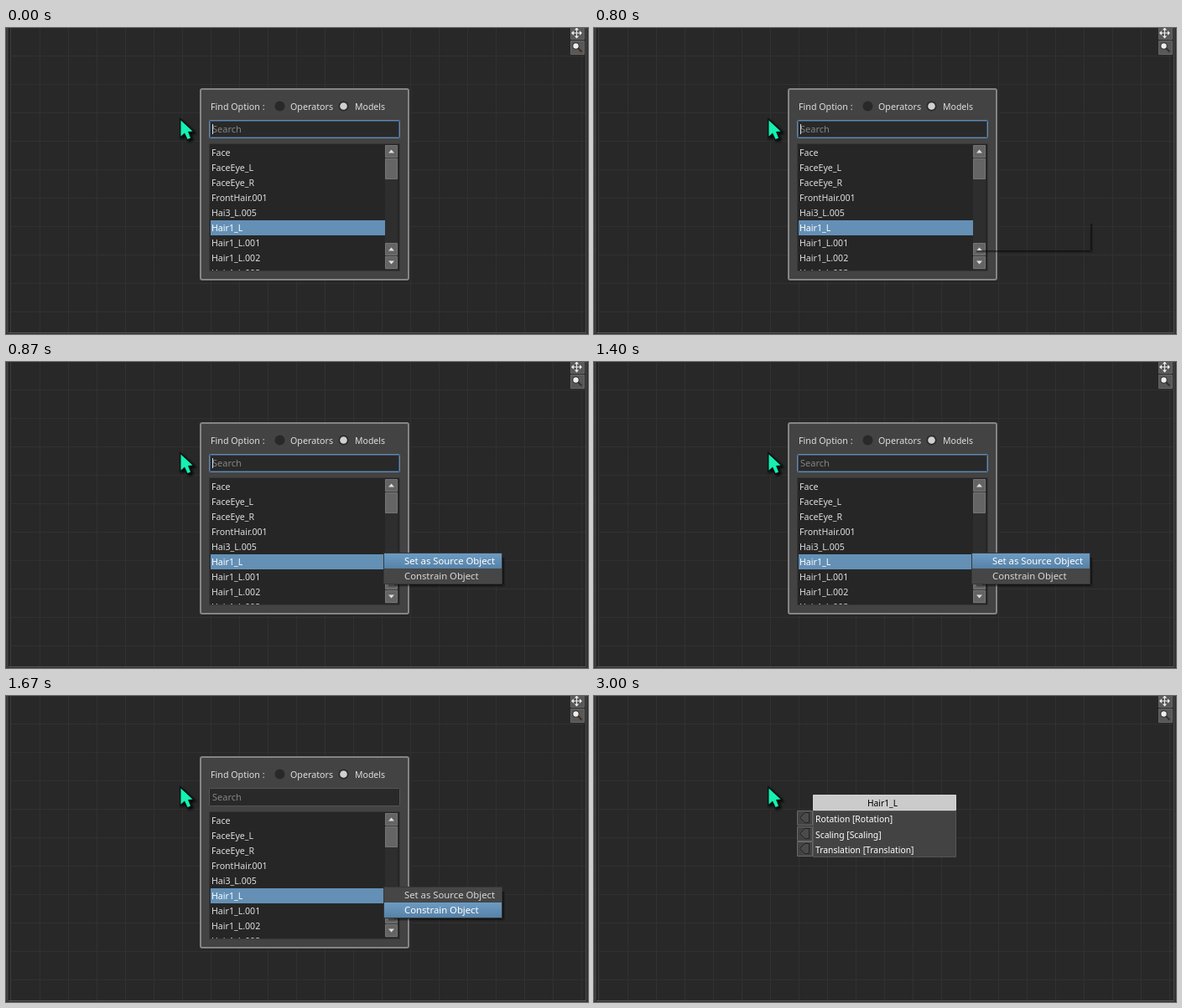
An HTML page with a canvas that plays this animation: 694x366 px, repeating every 3200 ms.

```html
<!DOCTYPE html>
<html lang="en">
<head>
<meta charset="utf-8">
<title>Node search popup</title>
<style>
html, body { margin: 0; width: 100%; height: 100%; overflow: hidden; background: #282828; }
canvas { display: block; }
</style>
</head>
<body>
<canvas id="stage" width="694" height="366"></canvas>
<script>
const ctx = document.getElementById('stage').getContext('2d');
const LOOP = 3200;
const ITEMS = ['Face', 'FaceEye_L', 'FaceEye_R', 'FrontHair.001', 'Hai3_L.005',
  'Hair1_L', 'Hair1_L.001', 'Hair1_L.002', 'Hair1_L.003'];
const BLUE = '#6490b6';

function rect(x, y, w, h, color) {
  ctx.fillStyle = color;
  ctx.fillRect(x, y, w, h);
}

function box(x, y, w, h, fill, border, line = 1, radius = 0) {
  ctx.beginPath();
  ctx.roundRect(x + line / 2, y + line / 2, w - line, h - line, radius);
  ctx.fillStyle = fill;
  ctx.fill();
  ctx.strokeStyle = border;
  ctx.lineWidth = line;
  ctx.stroke();
}

function polygon(points, fill, stroke, line = 1) {
  ctx.beginPath();
  points.forEach(([x, y]) => ctx.lineTo(x, y));
  ctx.closePath();
  if (fill) { ctx.fillStyle = fill; ctx.fill(); }
  if (stroke) { ctx.strokeStyle = stroke; ctx.lineWidth = line; ctx.stroke(); }
}

function disc(x, y, r, color) {
  ctx.beginPath();
  ctx.arc(x, y, r, 0, 7);
  ctx.fillStyle = color;
  ctx.fill();
}

function text(str, x, y, size, color = '#dedede', align = 'left') {
  ctx.font = `${size}px "Noto Sans", sans-serif`;
  ctx.textAlign = align;
  ctx.fillStyle = color;
  ctx.fillText(str, x, y);
}

function drawBackground() {
  rect(0, 0, 694, 366, '#282828');
  for (let x = 40; x < 690; x += 34) rect(x, 0, 1, 364, '#313131');
  for (let y = 33; y < 364; y += 34) rect(5, y, 686, 1, '#313131');
  rect(0, 0, 3, 366, '#343434');
  rect(1, 0, 1, 366, '#444');
  rect(3, 0, 2, 364, '#242424');
  rect(5, 0, 1, 364, '#3c3c3c');
  rect(691, 0, 1, 366, '#4a4a4a');
  rect(692, 0, 2, 366, '#303030');
  rect(3, 364, 689, 1, '#555');
  rect(0, 365, 694, 1, '#303030');
  drawToolButtons();
}

function drawToolButtons() {
  box(673, -3, 17, 17, '#585858', '#666');
  box(673, 15, 17, 17, '#585858', '#666');
  ctx.save();
  ctx.translate(680.5, 6);
  for (let i = 0; i < 4; i++) {
    rect(-.5, -5, 1, 5, '#eee');
    polygon([[0, -6.5], [2.7, -3.5], [-2.7, -3.5]], '#eee');
    ctx.rotate(Math.PI / 2);
  }
  ctx.restore();
  polygon([[682, 24], [686.5, 28.5]], null, '#402c20', 2);
  disc(679.5, 21.5, 4, '#222');
  disc(679.5, 21.5, 3.2, '#eee');
}

function drawScrollButton(y, direction) {
  box(452, y, 15, 15, '#646464', '#747474');
  const mid = y + 7.5;
  polygon([[459.5, mid - 2 * direction], [463, mid + 2 * direction], [456, mid + 2 * direction]], '#dedede');
}

function drawScrollBar() {
  rect(452, 140, 15, 149, '#3a3a3a');
  for (let y = 181; y < 257; y++)
    for (let x = 452 + y % 2; x < 467; x += 2) rect(x, y, 1, 1, '#222');
  drawScrollButton(140, 1);
  box(452, 156, 15, 25, '#656565', '#747474');
  drawScrollButton(257, 1);
  drawScrollButton(273, -1);
}

function drawSearch(focused, caret) {
  box(242, 110, 228, 22, '#292929', focused ? '#6489af' : '#545454', 1, 1);
  if (focused) box(243, 111, 226, 20, '#292929', '#3f566d');
  text('Search', 246, 125, 11, '#858585');
  if (caret) rect(246, 115, 1, 12, '#e0e0e0');
}

function drawDialog(focused, caret) {
  box(232, 73, 250, 230, '#222', '#242424', 1, 3);
  box(231, 72, 250, 230, '#434343', '#858585', 2, 2);
  text('Find Option :', 244, 98, 10.7);
  disc(326.5, 93.5, 6, '#292929');
  text('Operators', 339, 98, 10.7);
  disc(402.5, 93.5, 6, '#292929');
  disc(402.5, 93.5, 4.3, '#d0d0d0');
  text('Models', 416, 98, 10.5);
  drawSearch(focused, caret);

  box(242, 138, 228, 153, '#262626', '#363636');
  ctx.save();
  ctx.beginPath();
  ctx.rect(243, 139, 226, 151);
  ctx.clip();
  rect(244, 230, 208, 18, BLUE);
  ITEMS.forEach((item, i) => text(item, 245, 153 + 18 * i, 10.6, i === 5 ? '#fff' : '#dedede'));
  ctx.restore();
  drawScrollBar();
}

function drawMenuShadow() {
  for (let i = 0; i < 3; i++) {
    const color = `rgba(0,0,0,${.55 - .18 * i})`;
    rect(592 + i, 234, 1, 32 + i, color);
    rect(456, 266 + i, 136 + i, 1, color);
  }
}

function drawMenu(selected) {
  box(450, 228, 142, 38, '#464646', '#363636');
  const top = 229 + 18 * selected;
  const shine = ctx.createLinearGradient(0, top, 0, top + 18);
  shine.addColorStop(0, '#6d9bc3');
  shine.addColorStop(1, '#5782a8');
  rect(451, top, 140, 18, shine);
  ['Set as Source Object', 'Constrain Object'].forEach((label, i) =>
    text(label, 475, 242 + 18 * i, 11.3, i === selected ? '#fff' : '#d8d8d8'));
}

function drawNode() {
  box(261, 137, 171, 56, '#434343', '#555');
  box(261, 118, 171, 19, '#cbcbcb', '#d5d5d5');
  text('Hair1_L', 344, 132, 10.3, '#000', 'center');
  ['Rotation', 'Scaling', 'Translation'].forEach((name, i) => {
    const y = 137 + 18.6 * i;
    const top = Math.round(y);
    box(242, top, 19, 18, '#434343', '#696969');
    polygon([[245.5, top + 8.5], [251.5, top + 2.5], [256.5, top + 2.5],
      [256.5, top + 14.5], [251.5, top + 14.5]], '#4b4b4b', '#222');
    text(`${name} [${name}]`, 264, Math.round(y + 14), 10.35, '#fff');
  });
}

function drawCursor() {
  const arrow = [[208.5, 110.5], [208.5, 129.5], [213, 125.5], [216.5, 133],
    [220, 131.5], [217, 124], [222.5, 123.5]];
  ctx.save();
  ctx.shadowColor = 'rgba(0,0,0,.7)';
  ctx.shadowOffsetX = ctx.shadowOffsetY = 2;
  ctx.shadowBlur = 3;
  polygon(arrow, '#0b1512', '#0b1512', 3);
  ctx.restore();
  polygon(arrow, '#16f0b2');
}

function draw(t) {
  drawBackground();
  if (t < 2200) {
    drawDialog(t < 1670, t < 200 || (t >= 730 && t < 1270));
    if (t >= 800) drawMenuShadow();
    if (t >= 870) drawMenu(t < 1670 ? 0 : 1);
  } else {
    drawNode();
  }
  drawCursor();
}

const start = performance.now();
function tick() {
  draw((performance.now() - start) % LOOP);
  requestAnimationFrame(tick);
}
tick();
</script>
</body>
</html>
```
